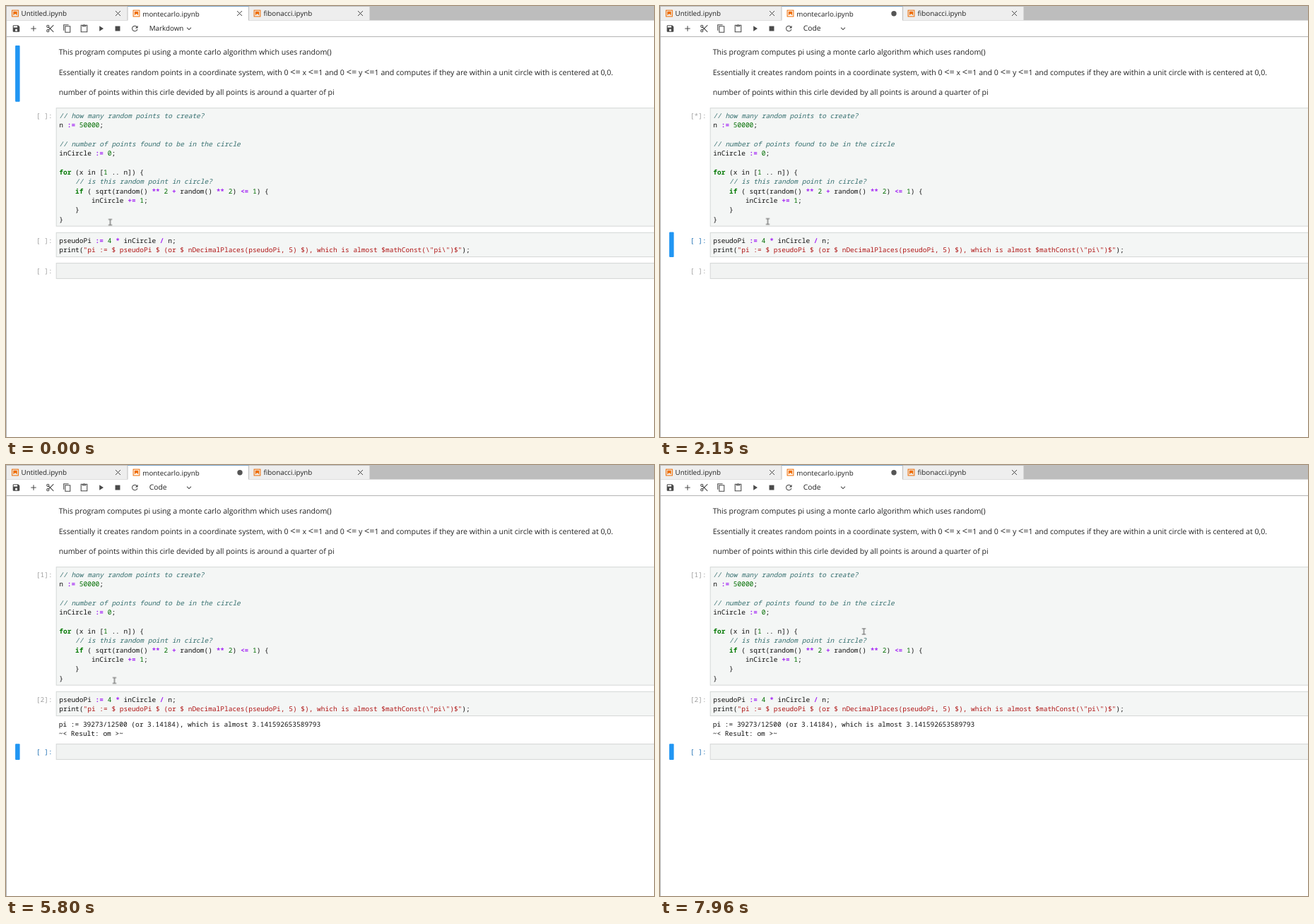
Recreate the animation shown at these times as an HTML page. Size 917 by 611 pixels, loop 8000 ms.

```html
<!DOCTYPE html>
<html lang="en">
<head>
<meta charset="utf-8">
<title>Notebook run</title>
<style>
  html, body { margin: 0; width: 100%; height: 100%; overflow: hidden; background: #fff; }
  svg { display: block; width: 917px; height: 611px; }
  text { font: 10.62px "Open Sans", "Noto Sans", sans-serif; fill: #212121;
         text-rendering: geometricPrecision; white-space: pre; }
  .math { font-size: 12.7px; }
  .ui text { font-size: 9.8px; }
  .ui #kindB { font-size: 10.3px; }
  text.code { font: 9.5px "Noto Sans Mono", "DejaVu Sans Mono", monospace; fill: #111; }
  .c { fill: #346e6e; font-style: italic; }
  .s { fill: #b01616; }
  .k { fill: #007800; font-weight: bold; }
  .n { fill: #006e00; }
  .o { fill: #a01cf5; font-weight: bold; }
  text.prompt { fill: #a0a0a0; }
  .box { fill: #f4f6f5; stroke: #d4d7d6; }
  .line { fill: none; stroke: #4a4a4a; stroke-width: 2; }
  .icons { fill: #4a4a4a; }

  .anim { animation: 8s step-end infinite; }
  #bar { animation-name: bar; }
  #kindA { animation-name: untilSelect; }
  #kindB { animation-name: fromSelect; }
  #close { animation-name: untilRun; }
  #dirty { animation-name: fromRun; }
  #p1 { animation-name: prompt1; }
  #p2 { animation-name: prompt2; }
  #p3 { animation-name: prompt3; }
  #busy1 { animation-name: busy1; }
  #done1 { animation-name: done1; }
  #busy2 { animation-name: busy2; }
  #done2, #out { animation-name: fromOutput; }
  #cell3 { animation-name: shift; }
  #cursor { animation-name: move; }
  #beam { animation-name: beam; }
  #arrow { animation-name: arrow; }

  @keyframes bar {
    0% { y: 56px; height: 79.7px; }
    17.125% { y: 144.4px; height: 168.2px; }
    26.875% { y: 320.6px; height: 35.4px; }
    48.25% { y: 364.3px; height: 22.6px; }
    49.375%, 100% { y: 395.3px; height: 22.6px; }
  }
  @keyframes untilSelect { 0% { visibility: visible; } 17.125%, 100% { visibility: hidden; } }
  @keyframes fromSelect { 0% { visibility: hidden; } 17.125%, 100% { visibility: visible; } }
  @keyframes untilRun { 0% { visibility: visible; } 26.875%, 100% { visibility: hidden; } }
  @keyframes fromRun { 0% { visibility: hidden; } 26.875%, 100% { visibility: visible; } }
  @keyframes fromOutput { 0% { visibility: hidden; } 49.375%, 100% { visibility: visible; } }
  @keyframes busy1 { 0%, 46.375%, 100% { visibility: hidden; } 26.875% { visibility: visible; } }
  @keyframes done1 { 0% { visibility: hidden; } 46.375%, 100% { visibility: visible; } }
  @keyframes busy2 { 0%, 49.375%, 100% { visibility: hidden; } 48.25% { visibility: visible; } }
  @keyframes prompt1 { 0%, 26.875%, 100% { fill: #a0a0a0; } 17.125% { fill: #1f70b4; } }
  @keyframes prompt2 { 0%, 48.25%, 100% { fill: #a0a0a0; } 26.875% { fill: #1f70b4; } }
  @keyframes prompt3 { 0% { fill: #a0a0a0; } 48.25%, 100% { fill: #1f70b4; } }
  @keyframes shift { 0% { transform: none; } 49.375%, 100% { transform: translateY(31px); } }
  @keyframes move {
    0% { transform: translate(147.5px, 306.5px); }
    4.5% { transform: translate(152.5px, 305.5px); }
    72.5% { transform: translate(153.5px, 305.5px); }
    73.5% { transform: translate(155.5px, 306.5px); }
    75.375% { transform: translate(160px, 311px); }
    76.35% { transform: translate(171px, 325px); }
    77.325% { transform: translate(187px, 344px); }
    78.3% { transform: translate(203px, 361px); }
    79.275% { transform: translate(214px, 372px); }
    80.25% { transform: translate(218px, 376px); }
    95.75% { transform: translate(224px, 362px); }
    96.6875% { transform: translate(243px, 327px); }
    97.625% { transform: translate(265px, 282px); }
    98.5625% { transform: translate(282px, 249px); }
    99.5%, 100% { transform: translate(288.5px, 236px); }
  }
  @keyframes beam { 0%, 96.6875%, 100% { visibility: visible; } 78.3% { visibility: hidden; } }
  @keyframes arrow { 0%, 96.6875%, 100% { visibility: hidden; } 78.3% { visibility: visible; } }
</style>
</head>
<body>
<svg viewBox="0 0 917 611">
  <defs>
    <g id="book">
      <rect x="-4.4" y="-4.4" width="8.8" height="8.8" fill="none" stroke="#ef6c00"/>
      <path d="M-2.7-2.7h5.4v5.4L0 .6l-2.7 2.1z" fill="#ef6c00"/>
    </g>
    <path id="x" d="M-3.5-3.5l7 7m0-7l-7 7" fill="none" stroke="#4a4a4a"/>
  </defs>

  <g class="ui">
    <rect width="917" height="20.5" fill="#bdbdbd"/>
    <path d="M1 1h170.5v19H1zM344 1h170.5v19H344z" fill="#eee"/>
    <path d="M172.5 0h170.5v21H172.5z" fill="#fff"/>
    <path d="M172 .5h171.5" stroke="#7ba4c9"/>
    <path d="M.5 0V611M0 43.5h917" fill="none" stroke="#b4b4b4"/>
    <use href="#book" x="13" y="10.5"/>
    <use href="#book" x="184.5" y="10.5"/>
    <use href="#book" x="355.5" y="10.5"/>
    <text x="21.6" y="14">Untitled.ipynb</text>
    <text x="193.3" y="15">montecarlo.ipynb</text>
    <text x="364.5" y="14">fibonacci.ipynb</text>
    <use href="#x" x="158.5" y="10.5"/>
    <use href="#x" x="501.5" y="10.5"/>
    <use href="#x" x="330.5" y="10.5" id="close" class="anim"/>
    <circle cx="331" cy="10.8" r="3.7" fill="#555" id="dirty" class="anim"/>
    <text x="202.7" y="35.3" id="kindA" class="anim">Markdown</text>
    <text x="202.7" y="35.3" id="kindB" class="anim">Code</text>
  </g>
  <g class="icons" id="icons"></g>

  <rect id="bar" class="anim" x="13.1" y="56" width="6.5" height="79.7" rx="1" fill="#2196f3"/>
  <text x="74.7" y="69">This program computes pi using a monte carlo algorithm which uses random()</text>
  <text x="74.7" y="97.7">Essentially it creates random points in a coordinate system, with 0 <tspan class="math">&lt;=</tspan> x <tspan class="math">&lt;=</tspan>1 and 0 <tspan class="math">&lt;=</tspan> y <tspan class="math">&lt;=</tspan>1 and computes if they are within a unit circle with is centered at 0,0.</text>
  <text x="74.7" y="126.4">number of points within this cirle devided by all points is around a quarter of pi</text>

  <rect class="box" x="71.2" y="144.7" width="850" height="167.4"/>
  <rect class="box" x="71.2" y="321.3" width="850" height="34.3"/>
  <g id="code"></g>
  <g class="anim" id="out">
    <text class="code" x="74.7" y="370.5">pi := 39273/12500 (or 3.14184), which is almost 3.141592653589793</text>
    <text class="code" x="74.7" y="384">~&lt; Result: om &gt;~</text>
  </g>

  <text class="code prompt anim" id="p1" x="42.8" y="159">[&#160;]:</text>
  <text class="code prompt anim" id="busy1" x="48.5" y="159">*</text>
  <text class="code prompt anim" id="done1" x="48.5" y="159">1</text>
  <text class="code prompt anim" id="p2" x="42.8" y="335.5">[&#160;]:</text>
  <text class="code prompt anim" id="busy2" x="48.5" y="335.5">*</text>
  <text class="code prompt anim" id="done2" x="48.5" y="335.5">2</text>
  <g class="anim" id="cell3">
    <rect class="box" x="71.2" y="364.6" width="850" height="21.8" style="fill:#f1f3f2"/>
    <text class="code prompt anim" id="p3" x="42.8" y="379.3">[&#160;]:</text>
  </g>

  <g id="cursor" class="anim">
    <path id="beam" class="anim" d="M-2.5-4H-.6L0-3.5.6-4H2.5M0-3.5V3.5M-2.5 4H-.6L0 3.5.6 4H2.5" fill="none" stroke="#333" stroke-width=".9"/>
    <path id="arrow" class="anim" d="M.5.5V8.6L2.4 6.9 3.7 9.7 5 9.1 3.8 6.4H6.3z" fill="#fff" stroke="#333" stroke-width=".8"/>
  </g>
</svg>
<script>
  const byId = id => document.getElementById(id);

  // Toolbar icons on a 24-unit grid: centre x, path, stroked or filled
  const icons = [
    [14.5, 'M17 3H5a2 2 0 0 0-2 2v14a2 2 0 0 0 2 2h14a2 2 0 0 0 2-2V7zM12 19a3 3 0 1 1 0-6 3 3 0 0 1 0 6zM15 9H5V5h10z'],
    [39, 'M19 13h-6v6h-2v-6H5v-2h6V5h2v6h6z'],
    [62.5, 'M9 6a3 3 0 1 0-6 0 3 3 0 0 0 6 0zM9 18a3 3 0 1 0-6 0 3 3 0 0 0 6 0zM8 8L21 21M8 16L21 3', true],
    [86.5, 'M3 17V2H16M7 6H20V22H7z', true],
    [110.5, 'M4 3H20V21H4zM8 3V6H16V3M10 2h4', true],
    [134.3, 'M8 5v14l11-7z'],
    [158, 'M5.5 5.5h13v13h-13z'],
    [182.3, 'M17.65 6.35A8 8 0 1 0 19.73 14h-2.08A6 6 0 1 1 16.22 7.78L13 11h7V4z'],
    [259, 'M6.5 9.5l5.5 5.5 5.5-5.5', true]
  ];
  byId('icons').innerHTML = icons.map(([x, d, line]) =>
    `<path d="${d}" fill-rule="evenodd" transform="translate(${x} 32) scale(.533) translate(-12 -12)"${line ? ' class="line"' : ''}/>`
  ).join('');

  const first = String.raw`// how many random points to create?
n := 50000;

// number of points found to be in the circle
inCircle := 0;

for (x in [1 .. n]) {
    // is this random point in circle?
    if ( sqrt(random() ** 2 + random() ** 2) <= 1) {
        inCircle += 1;
    }
}`;
  const second = String.raw`pseudoPi := 4 * inCircle / n;
print("pi := $ pseudoPi $ (or $ nDecimalPlaces(pseudoPi, 5) $), which is almost $mathConst(\"pi\")$");`;

  const token = /(\/\/.*)|("(?:\\.|[^"])*")|\b(for|if)\b|\b(\d+)\b|(:=|\+=|<=|\*\*|[+*\/])/g;
  const escape = s => s.replace(/</g, '&lt;').replace(/ /g, '\u00a0');

  function paint(line) {
    let html = '', end = 0;
    for (const m of line.matchAll(token)) {
      const kind = 'cskno'[m.slice(1).findIndex(Boolean)];
      html += escape(line.slice(end, m.index)) + `<tspan class="${kind}">${escape(m[0])}</tspan>`;
      end = m.index + m[0].length;
    }
    return html + escape(line.slice(end));
  }

  const block = (source, y) => source.split('\n').map((line, i) =>
    `<text class="code" x="75.3" y="${(y + i * 13.32).toFixed(1)}">${paint(line)}</text>`).join('');

  byId('code').innerHTML = block(first, 159) + block(second, 335.5);
</script>
</body>
</html>
```
